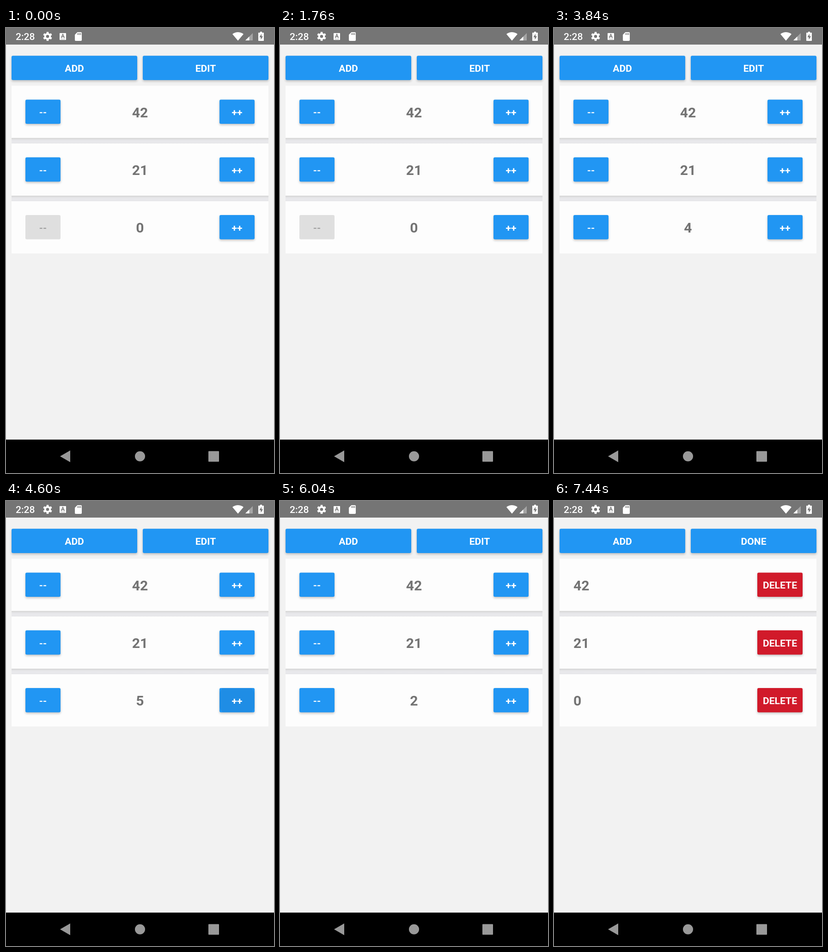
An HTML page that plays this animation: 580x966 px, repeating every 8 s.

```html
<!DOCTYPE html>
<html lang="en">
<head>
<meta charset="utf-8">
<title>Counters</title>
<style>
  html, body { margin: 0; width: 100%; height: 100%; overflow: hidden; background: #f2f2f2; }
  #stage { display: block; width: 100%; height: 100%; }
  text { font: 700 21.1px Roboto, Arial, sans-serif; text-anchor: middle; fill: #fff; }
  .clock { font-weight: 500; text-anchor: start; }
  .count { font-size: 30.1px; fill: #737373; }
  .left { text-anchor: start; }
  .shadow { filter: blur(2.8px); }
</style>
</head>
<body>
<svg id="stage" viewBox="0 0 580 966">
  <defs>
    <linearGradient id="gap" x2="0" y2="1">
      <stop offset="0" stop-color="#cfcfcf"/>
      <stop offset=".18" stop-color="#dededf"/>
      <stop offset=".45" stop-color="#e8e8eb"/>
      <stop offset=".85" stop-color="#e9e9ec"/>
      <stop offset="1" stop-color="#dadadd"/>
    </linearGradient>
  </defs>
  <rect width="580" height="966" fill="#f2f2f2"/>
  <g id="app"></g>

  <rect width="580" height="36" fill="#757575"/>
  <text class="clock" x="21" y="26.3">2:28</text>
  <g fill="#fff">
    <g transform="translate(90 18.2)">
      <circle r="5.3" fill="none" stroke="#fff" stroke-width="4"/>
      <g id="teeth"></g>
    </g>
    <rect x="116" y="11" width="14" height="15" rx="1"/>
    <path d="M154.500 9H162a2 2 0 0 1 2 2V26a2 2 0 0 1-2 2H151a2 2 0 0 1-2-2V14.500Z"/>
    <path d="M490 13.200Q502 4.800 514 13.200L502 27.500Z"/>
    <path d="M534 11V27H518Z" opacity=".35"/>
    <path d="M526.500 18.500V27H518Z"/>
    <path d="M550 8h4v2h3a1 1 0 0 1 1 1V27a1 1 0 0 1-1 1H547a1 1 0 0 1-1-1V11a1 1 0 0 1 1-1h3Z"/>
  </g>
  <g fill="none" stroke="#757575" stroke-width="1.700">
    <path d="M119.500 21.500L123 13.500L126.500 21.500M120.800 19H125.200"/>
    <path d="M119 24H127" stroke-width="1" stroke-dasharray="2 1"/>
    <path d="M155.500 11V15M158.500 11V15M161.500 11V15" stroke-width="1.500"/>
  </g>
  <path d="M553 12.500L548.500 20H551.500V25.500L556 18H553Z" fill="#757575"/>

  <rect y="893.500" width="580" height="72.500" fill="#000"/>
  <g fill="#999">
    <path d="M117 929.800L139 917V942.500Z"/>
    <circle cx="290" cy="929.800" r="11"/>
    <rect x="438" y="918.500" width="23" height="23" rx="1"/>
  </g>
</svg>
<script>
const LOOP = 8000, RIPPLE = 160, EDIT_AT = 7320;
const UPS = [2520, 2680, 3040, 3680, 4520];
const DOWNS = [5440, 5640, 5880, 6080, 6480];
const BLUE = '#2196f3', RED = '#d11a2a', GREY = '#dfdfdf';
const app = document.getElementById('app');

document.getElementById('teeth').innerHTML = [0, 1, 2, 3, 4, 5].map(i =>
  `<rect x="-2.3" y="-9.8" width="4.600" height="4.500" rx=".6" transform="rotate(${i * 60})"/>`).join('');

const clamp = v => Math.max(0, Math.min(1, v));
const passed = (times, t) => times.filter(at => at <= t);
const sinceLast = (times, t) => t - (passed(times, t).pop() ?? -LOOP);

function ripple(w, h, age) {
  const p = age / RIPPLE;
  if (p >= 1) return '';
  const start = w * .325, end = Math.hypot(w, h) / 2;
  const r = start + (end - start) * (1 - (1 - p) ** 2);
  return `<circle cx="${w / 2}" cy="${h / 2}" r="${r}" opacity="${.12 * (1 - p)}"/>`;
}

function button(x, y, w, label, { fill = BLUE, ink = '#fff', age = LOOP, lift = 1 } = {}) {
  const h = 52.7;
  return `<rect class="shadow" x="${x}" y="${y + 2.5}" width="${w}" height="${h}" rx="3" opacity="${.23 * lift}"/>
    <rect x="${x}" y="${y}" width="${w}" height="${h}" rx="3" fill="${fill}"/>
    <svg x="${x}" y="${y}" width="${w}" height="${h}">${ripple(w, h, age)}</svg>
    <text x="${x + w / 2}" y="${y + 34.8}" style="fill:${ink}">${label}</text>`;
}

function row(i, count, editing, minus, plus) {
  const y = 125.2 + i * 125.3, top = y + 30.2;
  const card = `<rect x="12" y="${y}" width="556" height="113.600" fill="#fdfdfd"/>`;
  const gap = i < 2 ? `<rect x="12" y="${y + 113.6}" width="556" height="11.700" fill="url(#gap)"/>` : '';
  const body = editing
    ? `<text class="count left" x="42" y="${y + 68.6}">${count}</text>` +
      button(440, top, 98, 'DELETE', { fill: RED })
    : `<text class="count" x="290" y="${y + 68.6}">${count}</text>` +
      button(42, top, 76, '--', minus) + button(462, top, 76, '++', plus);
  return card + gap + body;
}

function draw(t) {
  const count = passed(UPS, t).length - passed(DOWNS, t).length;
  const editing = t >= EDIT_AT;
  const lift = clamp((t - UPS[0]) / RIPPLE) - clamp((t - DOWNS[4]) / RIPPLE);
  const minus = count > 0
    ? { lift, age: sinceLast(DOWNS, t) }
    : { lift, fill: GREY, ink: '#a1a1a1' };
  const plus = { age: sinceLast(UPS, t) };
  // The mode switch fades slightly faster than the counter taps.
  const editAge = editing ? (t - EDIT_AT) * 4 / 3 : LOOP;

  app.innerHTML = button(12, 60.3, 272, 'ADD') +
    button(296, 60.3, 272, editing ? 'DONE' : 'EDIT', { age: editAge }) +
    row(0, 42, editing) + row(1, 21, editing) + row(2, count, editing, minus, plus);
}

function tick() {
  draw(performance.now() % LOOP);
  requestAnimationFrame(tick);
}
tick();
</script>
</body>
</html>
```
